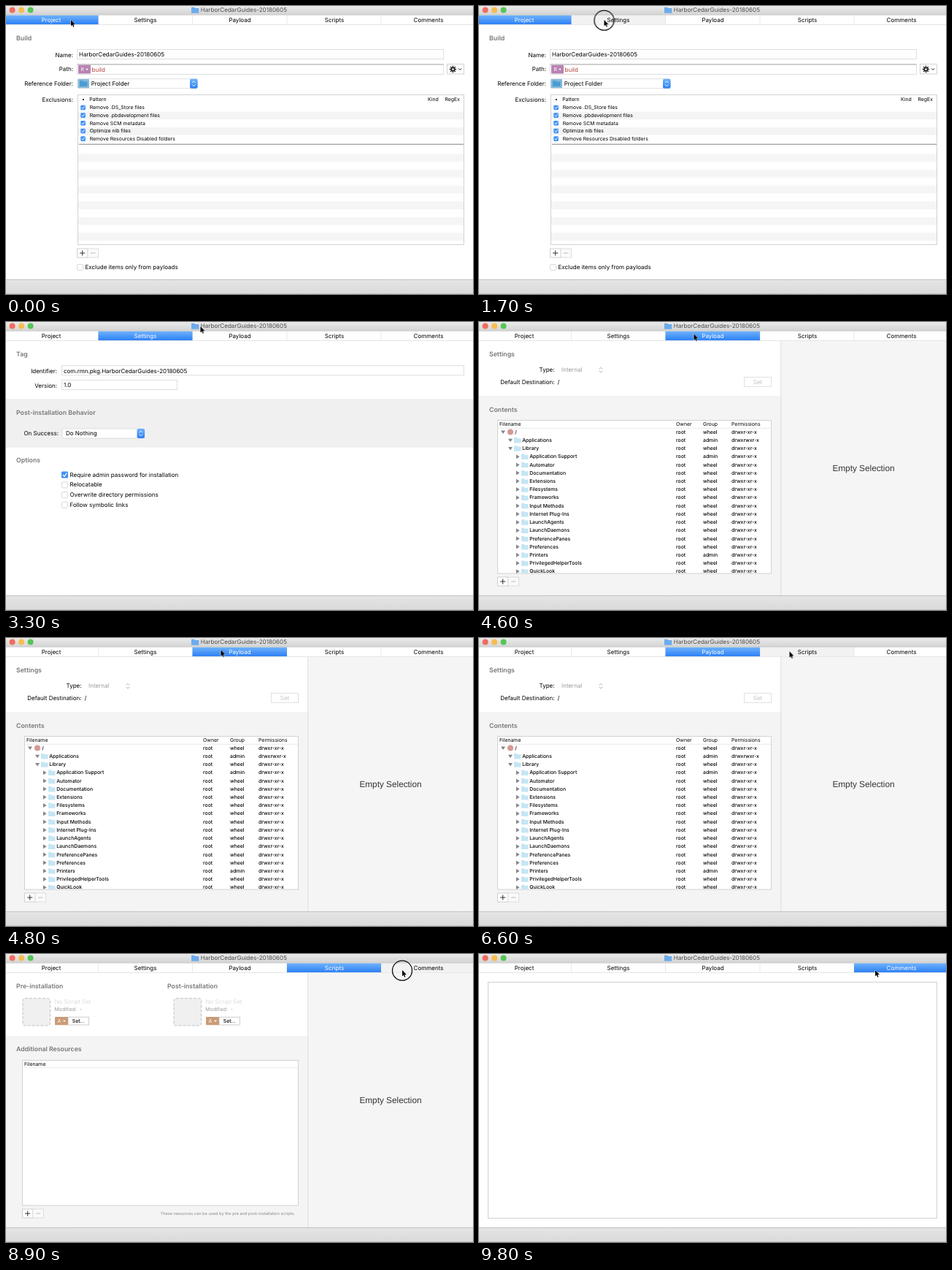
Animation, 640 px wide and 394 px high, one loop 9.9 s. Source, as an HTML page:

```html
<!DOCTYPE html>
<html lang="en">
<head>
<meta charset="utf-8">
<title>Package project tour</title>
<style>
html, body { margin: 0; width: 100%; height: 100%; overflow: hidden; background: #fff; }
svg { display: block; width: 640px; height: 394px; }
text {
  font: 8px Inter, "Open Sans", sans-serif; fill: #000; white-space: pre;
  text-rendering: geometricPrecision; transform: translateY(-.4px);
}
.head { font-size: 8.75px; font-weight: 600; fill: #777; }
.small { font-size: 6.9px; }
.row { font-size: 6.85px; font-weight: 500; }
.title { font-size: 8.1px; fill: #4c4c4c; }
.note { font-size: 5.65px; fill: #8a8a8a; }
.empty { font: 11.8px "Liberation Sans", Arial, sans-serif; fill: #333; }
.end { text-anchor: end; }
.mid { text-anchor: middle; }
.white { fill: #fff; }
.grey { fill: #999; }
.pale { fill: #c4c4c4; }
.faint { fill: #dcdcdc; }
.red { fill: #b5423c; }
.line { fill: none; stroke-linecap: round; stroke-linejoin: round; }

#strip, #cursor, #ring, .press { animation: 9.9s step-end infinite; }
#strip { animation-name: pages; }
#cursor { animation-name: travel; }
#ring { animation-name: ring; }
.press { animation-name: press; }

@keyframes pages {
  0% { transform: translateY(0); }
  19.19% { transform: translateY(-394px); }
  46.46% { transform: translateY(-788px); }
  67.67% { transform: translateY(-1182px); }
  90.9%, 100% { transform: translateY(-1576px); }
}
@keyframes ring {
  0%, 19.19%, 46.46%, 66.66%, 90.9%, 100% { visibility: hidden; }
  15.15%, 44.44%, 62.62%, 88.88% { visibility: visible; }
}
@keyframes press {
  0%, 19.19%, 46.46%, 67.67%, 90.9%, 100% { visibility: hidden; }
  15.15%, 44.44%, 62.62%, 88.88% { visibility: visible; }
}
/* The pointer moves in steps of 100 ms. */
@keyframes travel {
  0% { transform: translate(89px, 19px); animation-timing-function: steps(3); }
  3.03% { transform: translate(104px, 19px); animation-timing-function: steps(4); }
  7.07% { transform: translate(158px, 19px); animation-timing-function: steps(3); }
  10.1%, 28.28% { transform: translate(171.5px, 19px); }
  28.28% { animation-timing-function: steps(2); }
  30.3% { transform: translate(195px, 15px); animation-timing-function: steps(3); }
  33.33% { transform: translate(266.5px, 6px); animation-timing-function: steps(4); }
  37.37%, 49.49% { transform: translate(294.5px, 16.3px); }
  49.49% { animation-timing-function: steps(3); }
  52.52% { transform: translate(318px, 16.5px); animation-timing-function: steps(4); }
  56.56% { transform: translate(400px, 17.5px); animation-timing-function: steps(3); }
  59.59%, 75.75% { transform: translate(425.5px, 18.3px); }
  75.75% { animation-timing-function: steps(2); }
  77.77% { transform: translate(448px, 19px); animation-timing-function: steps(4); }
  81.81% { transform: translate(524px, 21px); animation-timing-function: steps(3); }
  84.84%, 100% { transform: translate(543px, 22px); }
}
</style>
</head>
<body>
<svg id="stage" viewBox="0 0 640 394">
  <defs>
    <linearGradient id="bar" x2="0" y2="1"><stop stop-color="#ebebeb"/><stop offset="1" stop-color="#d3d3d3"/></linearGradient>
    <linearGradient id="foot" x2="0" y2="1"><stop stop-color="#e5e5e5"/><stop offset="1" stop-color="#dadada"/></linearGradient>
    <linearGradient id="blue" x2="0" y2="1"><stop stop-color="#6fb3fb"/><stop offset="1" stop-color="#2d80f5"/></linearGradient>
    <clipPath id="list"><path d="M26 136H400V343.5H26Z"/></clipPath>
  </defs>
</svg>
<script>
const project = "HarborCedarGuides-20180605";
const tabs = ["Project", "Settings", "Payload", "Scripts", "Comments"];
const edges = [0, 126.5, 255.5, 385, 514, 640];
const centers = [62, 191, 320.5, 450, 579];

const text = (x, y, s, cls = "") => `<text x="${x}" y="${y}" class="${cls}">${s}</text>`;
const rect = (x, y, w, h, fill, extra = "") =>
  `<rect x="${x}" y="${y}" width="${w}" height="${h}" fill="${fill}" ${extra}/>`;
const line = (d, color, width = 1) =>
  `<path class="line" d="${d}" stroke="${color}" stroke-width="${width}"/>`;
const shape = (d, fill) => `<path d="${d}" fill="${fill}"/>`;
const box = (x, y, w, h, color = "#d6d6d6") => rect(x, y, w, h, "#fff", `stroke="${color}"`);

const field = (x, y, w, s) => box(x, y, w, 13, "#dedede") + text(x + 2.5, y + 10.2, s);

const folder = (x, y, w, h, fill) =>
  shape(`M${x} ${y}h${w * .4}l1 1.2H${x + w}v${h - 1.2}H${x}Z`, fill);

const check = (x, y, size, on) => on
  ? rect(x, y, size, size, "#3f8ff4", `rx="1.4"`) +
    line(`M${x + size * .25} ${y + size * .52}l${size * .2} ${size * .24}l${size * .33} ${-size * .5}`, "#fff", size * .14)
  : rect(x + .5, y + .5, size - 1, size - 1, "#fff", `rx="1.2" stroke="#d9d9d9"`);

const arrows = (x, y, color) =>
  line(`M${x - 2} ${y - 1.4}l2 -2l2 2M${x - 2} ${y + 1.4}l2 2l2 -2`, color, .9);

const popup = (x, y, w, s, indent) =>
  rect(x, y, w, 13, "#fff", `rx="2" stroke="#d9d9d9" stroke-width=".8"`) +
  text(x + indent, y + 9.7, s) +
  rect(x + w - 10.5, y, 10.5, 13, "url(#blue)", `rx="2"`) + arrows(x + w - 5.2, y + 6.5, "#fff");

const plusMinus = (x, y) =>
  box(x, y, 14.5, 12, "#cfcfcf") +
  rect(x + 14.5, y, 14.5, 12, "#fafafa", `stroke="#dedede"`) +
  line(`M${x + 4} ${y + 6}h6.4m-3.2 -3.2v6.4`, "#333", 1) +
  line(`M${x + 19} ${y + 6}h5.5`, "#bbb", 1);

const token = (x, y, w, h, letter, fill) =>
  rect(x, y, w, h, fill, `rx="1"`) + text(x + 3.5, y + h - 2.7, letter, "white small") +
  shape(`M${x + w - 7} ${y + h / 2 - .8}h4l-2 2.2Z`, "#fff");

function gear(x, y) {
  let teeth = "";
  for (let i = 0; i < 8; i++) {
    const a = i * Math.PI / 4;
    teeth += `M${x} ${y}l${4.2 * Math.cos(a)} ${4.2 * Math.sin(a)}`;
  }
  return line(teeth, "#222", 1.4) + `<circle cx="${x}" cy="${y}" r="2.2" fill="#fff" stroke="#222" stroke-width="1.7"/>`;
}

const sidePane = top =>
  rect(0, top, 414, 374 - top, "#f4f4f4") + rect(414, 26, 226, 348, "#f5f5f5") +
  line("M413.7 26V374", "#d9d9d9", .8) + text(527, 204.4, "Empty Selection", "empty mid");

function projectPage() {
  const rules = ["Remove .DS_Store files", "Remove .pbdevelopment files", "Remove SCM metadata",
    "Optimize nib files", "Remove Resources Disabled folders"];
  let s = text(14, 47, "Build", "head");
  ["Name:", "Path:", "Reference Folder:", "Exclusions:"].forEach((label, i) =>
    s += text(92, [70, 89.6, 109, 131.5][i], label, "end"));
  s += field(97.5, 59.5, 502, project);
  s += box(97.5, 79.5, 502, 14, "#dedede") + line("M98 80H599", "#b0b0b0") +
    token(99, 80.8, 17, 11.6, "R", "#b982b4") + text(117.5, 90, "build", "red");
  s += box(604.5, 79.5, 23, 13.5, "#d2d2d2") + gear(612.5, 86.5) + line("M620.3 85.6l1.8 1.9l1.8 -1.9", "#222");
  s += popup(98, 99.7, 164.5, "Project Folder", 18.7) +
    rect(98.5, 100, 15.5, 12.3, "#85b9dc", `rx="1"`) + folder(101, 102.2, 10.5, 7.8, "#4a9bd3");
  s += box(98.5, 121.5, 529, 205, "#d2d2d2") + text(104, 130.5, "•", "small") +
    text(114.2, 130.5, "Pattern", "small") + text(578, 130.5, "Kind", "small") + text(601.5, 130.5, "RegEx", "small");
  rules.forEach((rule, i) => {
    const y = 134 + 10.65 * i;
    if (i % 2) s += rect(99, y, 528, 10.65, "#f4f4f4");
    s += check(102.3, y + 1.7, 6.6, true) + text(114.7, y + 7.7, rule, "small");
  });
  s += line("M100.5 189.2H626.5", "#aaa", 1.6);
  for (let i = 0; i < 6; i++) s += rect(99, 202.5 + 21.6 * i, 528, 10.7, "#f5f5f5");
  return s + plusMinus(97.5, 332) + check(97, 353, 9, false) + text(108.5, 360.4, "Exclude items only from payloads");
}

function settingsPage() {
  let s = text(14, 47, "Tag", "head") + text(70, 70, "Identifier:", "end") + text(70, 90, "Version:", "end") +
    field(76.5, 59.8, 551, "com.rmn.pkg." + project) + field(76.5, 79.6, 158, "1.0") +
    rect(0, 106, 640, 65, "#f0f0f0") + line("M0 106H640M0 171H640", "#e6e6e6", .7) +
    text(14, 127.2, "Post-installation Behavior", "head") + text(72, 155.5, "On Success:", "end") +
    popup(77, 146, 113, "Do Nothing", 5) + text(14, 192.4, "Options", "head");
  ["Require admin password for installation", "Relocatable", "Overwrite directory permissions", "Follow symbolic links"]
    .forEach((label, i) => {
      const y = 204.6 + 13.75 * i;
      s += check(76, y, 9, !i) + text(87.5, y + 7.5, label);
    });
  return s;
}

function payloadPage() {
  const names = ["/", "Applications", "Library", "Application Support", "Automator", "Documentation", "Extensions",
    "Filesystems", "Frameworks", "Input Methods", "Internet Plug-Ins", "LaunchAgents", "LaunchDaemons",
    "PreferencePanes", "Preferences", "Printers", "PrivilegedHelperTools", "QuickLook"];
  const admin = ["Applications", "Application Support", "Printers"];
  let s = sidePane(101) + text(14, 47.3, "Settings", "head") + text(103.5, 68.8, "Type:", "end") +
    text(113, 68.8, "Internal", "grey") + arrows(167, 65.7, "#aaa") +
    text(103.5, 85.7, "Default Destination:", "end") + text(107.5, 85.7, "/") +
    box(363.5, 75.5, 37, 13, "#e0e0e0") + text(382, 85.4, "Set", "pale mid") +
    text(14, 123, "Contents", "head") + box(25.5, 134.5, 375, 209.5, "#d2d2d2") +
    line("M26 145.3H400", "#e0e0e0", .7);
  ["Filename", "Owner", "Group", "Permissions"].forEach((label, i) =>
    s += text([28, 270, 307, 346][i], 142.5, label, "small"));
  s += `<g clip-path="url(#list)">`;
  names.forEach((name, i) => {
    const y = 150.5 + 11.22 * i, depth = i ? (i < 3 ? 1 : 2) : 0, x = 33 + 10 * depth;
    s += depth < 2
      ? shape(`M${x - 3} ${y - 2}h6l-3 4.6Z`, "#858585")
      : shape(`M${x - 2} ${y - 3}v6l4.6 -3Z`, "#858585");
    s += depth ? folder(x + 5, y - 3.6, 9.5, 7.4, "#c4e6f5") : `<circle cx="43" cy="${y}" r="4" fill="#d39a94"/>`;
    s += text(x + 16.2, y + 2.6, name, "row") + text(270, y + 2.6, "root", "row") +
      text(307, y + 2.6, admin.includes(name) ? "admin" : "wheel", "row") +
      text(346, y + 2.6, i == 1 ? "drwxrwxr-x" : "drwxr-xr-x", "row");
  });
  return s + "</g>" + plusMinus(25.5, 349);
}

const scriptSlot = (x, label) =>
  text(x, 47.3, label, "head") +
  rect(x + 9, 60.7, 37.5, 37.3, "#f0f0f0", `rx="3" stroke="#c2c2c2" stroke-dasharray="4 2"`) +
  text(x + 52.5, 68.2, "No Script Set", "faint") +
  text(x + 52.3, 78.7, "Modified:  -", "small grey") +
  box(x + 71, 86.3, 28.5, 10.7, "#cfcfcf") + text(x + 85.3, 94.2, "Set...", "row mid") +
  token(x + 53, 86, 18, 11.3, "A", "#cb9c78");

const scriptsPage = () =>
  sidePane(112) + scriptSlot(14, "Pre-installation") + scriptSlot(221, "Post-installation") +
  text(14, 133.3, "Additional Resources", "head") + box(22.5, 145.5, 378, 198.5, "#d2d2d2") +
  text(25, 153.2, "Filename", "small") + line("M23 155.5H400", "#e6e6e6", .7) + plusMinus(22.5, 349) +
  text(396, 357.3, "These resources can be used by the pre and post-installation scripts.", "note end");

const commentsPage = () => box(12.5, 38.5, 615, 323, "#d0d0d0");

function tabBar(selected) {
  const cell = (i, fill, extra) => rect(edges[i], 12.5, edges[i + 1] - edges[i], 12.6, fill, extra);
  let s = rect(0, 12, 640, 14, "#fff") + line("M0 25.5H640", "#dcdcdc", .7);
  if (selected < 4) s += cell(selected + 1, "#f2f2f2", `class="press"`);
  for (let i = 1; i < 5; i++) s += line(`M${edges[i]} 13V25`, "#e4e4e4", .8);
  s += cell(selected, "url(#blue)");
  tabs.forEach((tab, i) => s += text(centers[i], 22.5, tab, i == selected ? "mid white" : "mid"));
  return s;
}

const pages = [projectPage, settingsPage, payloadPage, scriptsPage, commentsPage];
const strip = pages.map((page, i) =>
  `<g transform="translate(0 ${394 * i})">${rect(0, 0, 640, 394, "#fff")}${page()}${tabBar(i)}</g>`).join("");

const lights = ["#f26b62", "#f6bd4d", "#55c655"].map((color, i) =>
  `<circle cx="${8.6 + 12.5 * i}" cy="5.4" r="4" fill="${color}"/>`).join("");
const chrome = rect(0, 0, 640, 12.2, "url(#bar)") + line("M0 12.2H640", "#c2c2c2", .7) + lights +
  folder(254, 1.8, 10.3, 8, "#6cabec") + text(266.7, 8.8, project, "title") +
  rect(0, 374, 640, 20, "url(#foot)") + line("M0 374.4H640", "#bcbcbc", .9) + line("M0 393.7H640", "#b5b5b5", .6);

const cursor = `<circle id="ring" cy=".7" r="13.5" fill="none" stroke="#111" stroke-width="1.3"/>
  <path d="M0 0V8.5L1.9 6.7L3.2 9.7L4.5 9.2L3.2 6.2H6Z" fill="#000" stroke="#fff" stroke-width=".9" paint-order="stroke"/>`;

document.getElementById("stage").insertAdjacentHTML("beforeend",
  `<g id="strip">${strip}</g>${chrome}<g id="cursor">${cursor}</g>`);
</script>
</body>
</html>
```
